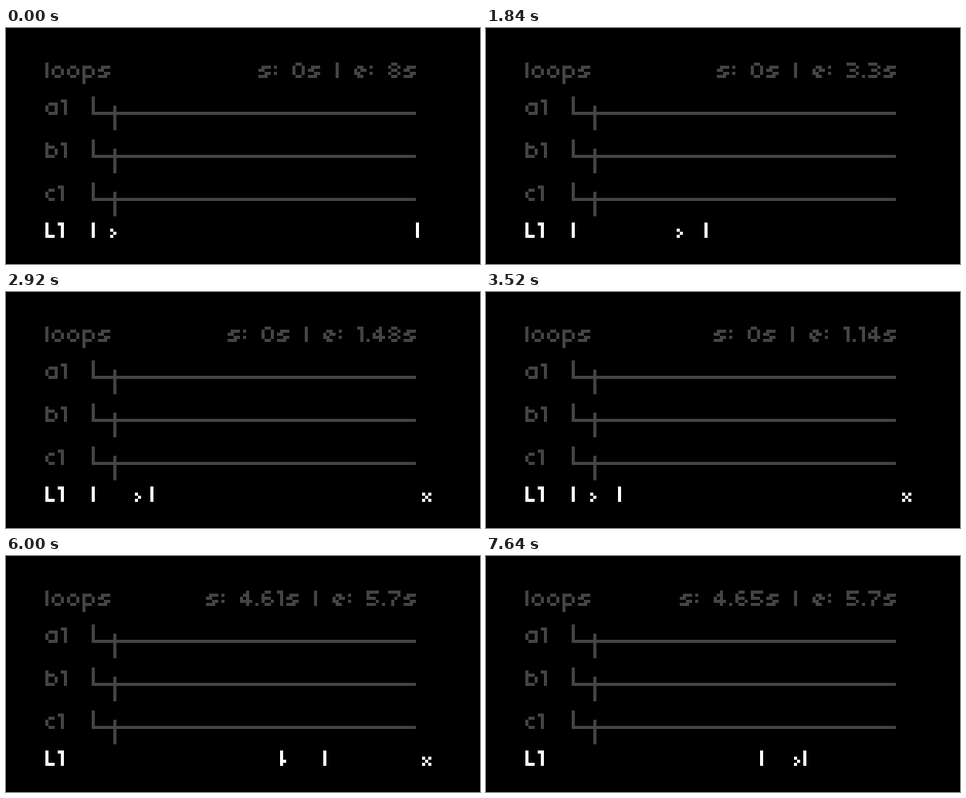
These frames come from a looping animation (614 px wide and 307 px high, 7.68 s). An HTML page:

```html
<!DOCTYPE html>
<html lang="en">
<head>
<meta charset="utf-8">
<title>loops</title>
<style>
  html, body { margin: 0; width: 100%; height: 100%; overflow: hidden; background: #000; }
  svg { display: block; width: 614px; height: 307px; }
  path { fill: none; stroke-width: 1; stroke-linecap: square; stroke-linejoin: miter; }
  .dim { stroke: #444; }
  .lit { stroke: #fff; }
</style>
</head>
<body>
<svg viewBox="0 0 614 307" role="img" shape-rendering="crispEdges">
  <g id="screen" transform="translate(53 27) scale(4)"></g>
</svg>
<script>
const LOOP = 7680, TICK = 40;
const LEFT = 15, RIGHT = 120, SECONDS = 8;
const HEAD_SPEED = 15; // columns per second

// Pixel lettering: pen strokes on a grid, rows 0 to 4 above the baseline.
const PEN = {
  0: 'M1 0h1M0 1v2M3 1v2M1 4h1',
  1: 'M0 0h1v4',
  2: 'M0 0h2M3 1h0M1 2h1M0 3v1h3',
  3: 'M0 0h2M3 1h0M1 2h1M3 3h0M0 4h2',
  4: 'M2 0v4M1 1h0M0 2v1h3',
  5: 'M3 0h-3v2h2M3 3h0M0 4h2',
  6: 'M1 0h1M0 1v2M1 2h1M3 3h0M1 4h1',
  7: 'M0 0h3v1M2 2h0M1 3v1',
  8: 'M1 0h1M0 1h0M3 1h0M1 2h1M0 3h0M3 3h0M1 4h1',
  9: 'M1 0h1M0 1h0M3 1v2M1 2h1M1 4h1',
  a: 'M1 1h2v3h-2M0 2v1',
  b: 'M0 0v4h2M1 1h1M3 2v1',
  c: 'M1 1h1M0 2v1M1 4h1',
  e: 'M1 1h1M0 2v1h1M2 2h1M1 4h1',
  l: 'M0 0v4',
  o: 'M1 1h1M0 2v1M3 2v1M1 4h1',
  p: 'M0 1v5M0 1h2M3 2v1M1 4h1',
  s: 'M1 1h2M0 2h1M2 3h1M0 4h2',
  x: 'M0 2h0M2 2h0M1 3h0M0 4h0M2 4h0',
  L: 'M0 0v4h2',
  '.': 'M0 4h0',
  ':': 'M0 1h0M0 3h0',
  '|': 'M0 0v4',
  '>': 'M0 2h0M1 3h0M0 4h0',
  ' ': ''
};
const WIDTH = { 1: 2, '.': 1, ':': 1, '|': 1, l: 1, '>': 2, c: 3, L: 3, x: 3, ' ': 3 };

// Time in ms, loop end in seconds.
const END_CURVE = [[0, 8], [640, 8], [800, 7.5], [1840, 3.3], [1960, 2.8],
  [2400, 1.95], [2880, 1.48], [3120, 1.3], [3440, 1.14]];
// Times at which the loop window moves on by its own length.
const SHIFTS = [4100, 4350, 4593, 4921];
const WINDOW = 1.14;
// Time in ms, column the play head starts from.
const HEAD_RUNS = [[0, 21.5], [1980, 15], [3118, 15], [4100, 29.96], [4350, 44.93],
  [4593, 59.89], [4921, 74.85], [5922, 75.5], [6875, 76.03]];
const MARK_ON = 2640, MARK_OFF = 6800;

const screen = document.getElementById('screen');

function addGroup() {
  const g = document.createElementNS('http://www.w3.org/2000/svg', 'g');
  screen.append(g);
  return g;
}

function textWidth(text) {
  return [...text].reduce((sum, ch) => sum + (WIDTH[ch] || 4) + 1, -1);
}

function write(text, x, y, tone) {
  let out = '';
  for (const ch of text) {
    out += `<path class="${tone}" transform="translate(${x} ${y})" d="${PEN[ch]}"/>`;
    x += (WIDTH[ch] || 4) + 1;
  }
  return out;
}

function interpolate(points, t) {
  const i = points.findIndex(p => p[0] > t);
  if (i < 0) return points[points.length - 1][1];
  const [t0, v0] = points[i - 1], [t1, v1] = points[i];
  return v0 + (v1 - v0) * (t - t0) / (t1 - t0);
}

function loopRange(t) {
  const moved = SHIFTS.filter(at => t >= at).length;
  const trim = Math.min(0.09, Math.max(0, (t - 5720) / 6000));
  const end = interpolate(END_CURVE, Math.floor(t / 80) * 80);
  return [moved * WINDOW + trim, end + moved * WINDOW].map(v => +v.toFixed(2));
}

function headColumn(t) {
  const [at, from] = HEAD_RUNS.filter(run => t >= run[0]).pop();
  return Math.floor(from + (t - at) / 1000 * HEAD_SPEED);
}

const column = sec => Math.round(LEFT + sec * (RIGHT - LEFT) / SECONDS);

function drawStatic() {
  let out = write('loops', 0, 5, 'dim') + write('L1', 0, 57, 'lit');
  ['a1', 'b1', 'c1'].forEach((name, i) => {
    const y = 17 + i * 14;
    out += write(name, 0, y, 'dim');
    out += `<path class="dim" d="M${LEFT} ${y - 1}v5H${RIGHT - 1}M22 ${y + 2}v7"/>`;
  });
  addGroup().innerHTML = out;
}

drawStatic();
const live = addGroup();
let shown = -1;

function draw(t) {
  const [start, end] = loopRange(t);
  const label = `s: ${start}s | e: ${end}s`;
  live.innerHTML =
    write(label, RIGHT - textWidth(label), 5, 'dim') +
    write('|', column(start), 57, 'lit') +
    write('|', column(end), 57, 'lit') +
    write('>', headColumn(t), 57, 'lit') +
    (t >= MARK_ON && t < MARK_OFF ? write('x', 122, 57, 'lit') : '');
}

const origin = performance.now();
function frame() {
  const elapsed = Math.max(0, performance.now() - origin) % LOOP;
  const t = Math.floor(elapsed / TICK) * TICK;
  if (t !== shown) draw(shown = t);
  requestAnimationFrame(frame);
}
frame();
</script>
</body>
</html>
```
